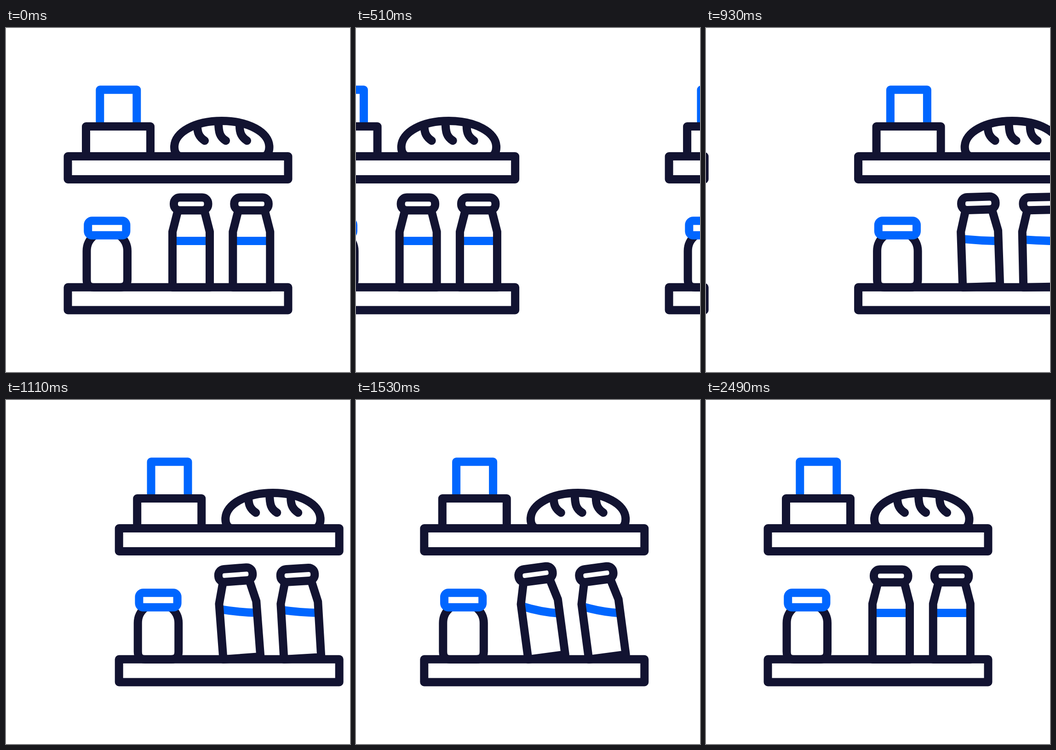
An HTML page that plays this animation: 748 by 748 pixels, repeating every 2520 ms.

```html
<!DOCTYPE html>
<html lang="en">
<head>
<meta charset="utf-8">
<title>Grocery shelves</title>
<style>
html, body { margin: 0; width: 100%; height: 100%; overflow: hidden; background: #fff; }
svg { display: block; width: 100%; height: 100%; }
.ink, .blue { fill: none; stroke-width: 18; stroke-linejoin: round; }
.ink { stroke: #121331; }
.blue { stroke: #06f; }
</style>
</head>
<body>
<svg id="stage" viewBox="0 0 748 748"></svg>
<script>
const LOOP = 2520, SLIDE = 1800, SPACING = 813.5;
const LAG = 70;            // second bottle follows the first
const PIVOT = '362 573';

const path = (cls, d, extra = '') => `<path class="${cls}" d="${d}" ${extra}/>`;
const rect = (cls, x, y, w, h, rx = 0) =>
  `<rect class="${cls}" x="${x}" y="${y}" width="${w}" height="${h}" rx="${rx}"/>`;

const bottle = x => `<g transform="translate(${x})"><g class="bottle">
  ${path('blue liquid', 'M362 463H443')}
  ${path('ink', 'M373 400L362 443V564H443V443L432 400')}
  ${rect('ink', 365, 368.5, 74.5, 28, 13)}
</g></g>`;

const shelves = gap => `<g class="shelves">
  ${path('blue', 'M204.3 214V134.3H284.3V214')}
  ${path('ink', 'M174 279V214H314V279')}
  ${path('ink', 'M380 279C370 279 366 268 366 259C366 226 412 202 469 202C526 202 572.5 226 572.5 259C572.5 268 569 279 559 279Z')}
  ${path('ink', 'M416 213C416 228 420 237 432 245M462 205C462 227 465 237 478 245M508 213C508 228 512 237 524 245', 'stroke-linecap="round"')}
  ${rect('ink', 134.5, 279, 479, 50)}
  ${path('ink', 'M192 451C181 460 175.5 470 175.5 485V547Q175.5 564 191 564H248Q264 564 264 547V485C264 470 258 460 247 451')}
  ${rect('blue', 178.2, 419.2, 83.2, 31.6, 9)}
  ${bottle(0)}${bottle(gap)}
  ${rect('ink', 134.5, 563.8, 479, 49.7)}
</g>`;

const stage = document.getElementById('stage');
stage.innerHTML = shelves(131.3) + shelves(131.8);
const [leaving, arriving] = stage.querySelectorAll('.shelves');
const bottles = arriving.querySelectorAll('.bottle');

const clamp = v => Math.min(1, Math.max(0, v));
const smooth = s => s * s * (3 - 2 * s);

// Cubic bezier easing with control points (.333, 0) and (.3, 1)
function slide(u) {
  let lo = 0, hi = 1;
  for (let i = 0; i < 24; i++) {
    const s = (lo + hi) / 2, r = 1 - s;
    const x = s * r * r + 0.9 * s * s * r + s * s * s;
    if (x < u) lo = s; else hi = s;
  }
  return smooth((lo + hi) / 2);
}

// Eased interpolation through [time, value] keys
function track(keys, t) {
  let v = keys[0][1];
  for (let i = 1; i < keys.length; i++) {
    const [a, from] = keys[i - 1], [b, to] = keys[i];
    if (t > a) v = from + (to - from) * smooth(clamp((t - a) / (b - a)));
  }
  return v;
}

const TILT = [[648, 0], [1498, 7.6], [1650, 7.6], [2125, 0]];
const SLOSH = [[560, 0], [1640, 19], [1890, -8], [2080, 5], [2260, -1.5], [2420, 0]];

function draw(t) {
  const x = -SPACING * slide(clamp(t / SLIDE));
  leaving.setAttribute('transform', `translate(${x})`);
  arriving.setAttribute('transform', `translate(${x + SPACING})`);
  bottles.forEach((b, i) => {
    const time = t - i * LAG;
    b.setAttribute('transform', `rotate(${-track(TILT, time)} ${PIVOT})`);
    const slope = track(SLOSH, time), sag = slope * 0.15;
    const rise = 40.5 * Math.tan(slope * Math.PI / 180);
    b.querySelector('.liquid').setAttribute('d',
      `M362 ${463 - sag - rise}Q402.5 ${463 + sag} 443 ${463 - sag + rise}`);
  });
}

const start = performance.now();
function tick() {
  draw((performance.now() - start) % LOOP);
  requestAnimationFrame(tick);
}
draw(0);
requestAnimationFrame(tick);
</script>
</body>
</html>
```
